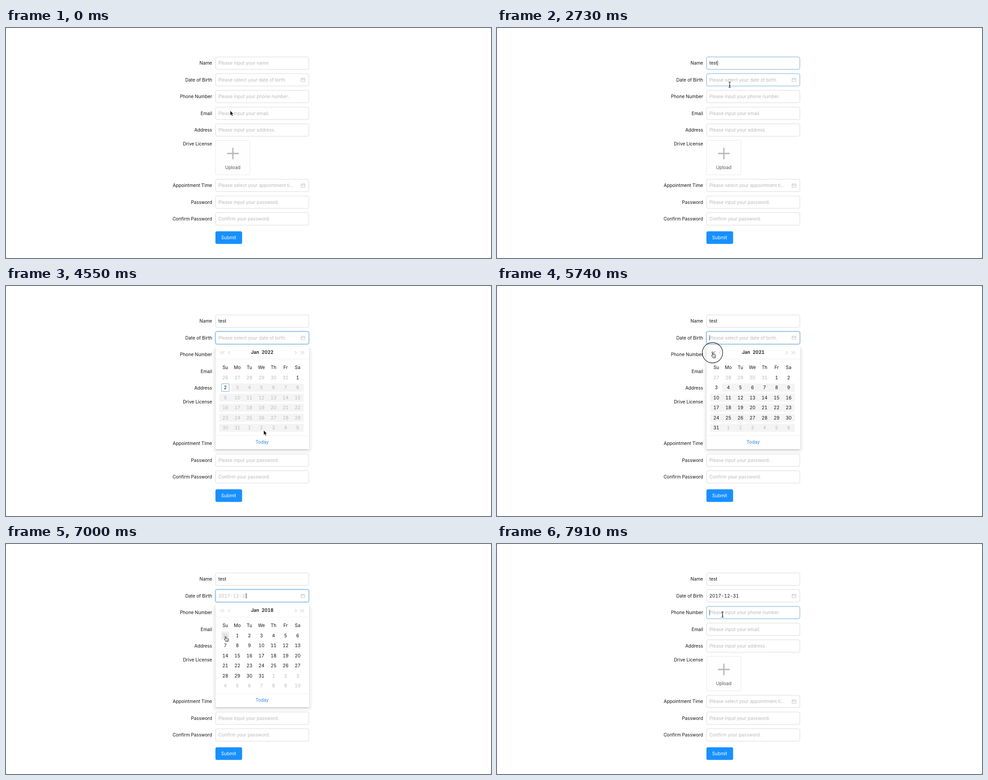
Animation, 1086 px wide and 515 px high, one loop 8 s. Source, as an HTML page:

```html
<!DOCTYPE html>
<html lang="en">
<head>
<meta charset="utf-8">
<title>Registration form</title>
<style>
  html, body { margin: 0; width: 100%; height: 100%; overflow: hidden; background: #999; }
  svg { display: block; width: 1086px; height: 515px; }
  text { font: 10.2px Inter, Roboto, sans-serif; font-variant-numeric: tabular-nums; white-space: pre; }
</style>
</head>
<body>
<svg id="stage" viewBox="0 0 1086 515"></svg>
<script>
const LOOP = 8000, STEP = 70;
const INK = '#141414', MUTED = '#b9b9b9', LINE = '#d9d9d9', BLUE = '#1890ff', FOCUS = '#6aa9d6';
const LEFT = 475.5, DAY = 864e5, TODAY = Date.UTC(2022, 0, 2);
const stage = document.getElementById('stage');

const YEAR_CLICKS = [5740, 5950, 6090, 6230];
const KEYS = [[1750, 't', 3.7], [1890, 'te', 9.7], [2100, 'tes', 15.1], [2240, 'test', 18.6]];
const OPEN = 2940, CLOSE = 7210, DATE_FOCUS = 2870, PHONE_FOCUS = 7840;

// Pointer path: time, x, y
const PATH = [
  [70, 502, 185], [490, 526, 74], [630, 519.5, 82], [1260, 519.5, 82], [1400, 520.5, 86],
  [2380, 520.5, 86], [2730, 521, 127], [3150, 521, 127], [3990, 569, 293], [4200, 586, 338],
  [4340, 586, 338], [4550, 577, 323], [4760, 562, 285], [4900, 562, 285], [5530, 483, 149.5],
  [6370, 483, 149.5], [6860, 491.5, 207], [7280, 491.5, 207], [7770, 505, 158], [LOOP, 505, 158]
];

const clamp = v => Math.max(0, Math.min(1, v));
const ease = v => v * v * (3 - 2 * v);

function pointerAt(t) {
  const i = PATH.findIndex(p => p[0] > t);
  if (i === 0) return PATH[0].slice(1);
  const [t0, x0, y0] = PATH[i - 1], [t1, x1, y1] = PATH[i];
  const k = ease((t - t0) / (t1 - t0));
  return [x0 + (x1 - x0) * k, y0 + (y1 - y0) * k];
}

const text = (x, mid, str, fill = INK, anchor = 'start', weight = 400) =>
  `<text x="${x}" y="${mid + 3.7}" fill="${fill}" text-anchor="${anchor}" style="font-weight:${weight}">${str}</text>`;
const rect = (x, y, w, h, attrs) => `<rect x="${x}" y="${y}" width="${w}" height="${h}" ${attrs}/>`;
const path = (d, stroke, width = 1, extra = '') =>
  `<path d="${d}" fill="none" stroke="${stroke}" stroke-width="${width}" ${extra}/>`;
const label = (mid, str) => text(461.5, mid, str, INK, 'end');
const caret = (x, mid) => path(`M${x} ${mid - 6}v12`, '#333', 0.9);

function calendarIcon(mid) {
  return path(`M660.8 ${mid - 3.2}h8.4v7.4h-8.4zM660.8 ${mid - 0.4}h8.4M663 ${mid - 4.7}v2.6M667 ${mid - 4.7}v2.6`, MUTED, 0.8);
}

function field(mid, name, str, { color = MUTED, border = LINE, glow = false, icon = false } = {}) {
  const halo = glow ? rect(468.5, mid - 14.5, 210, 29, 'rx="4" fill="none" stroke="#cfe6fa" stroke-width="3"') : '';
  return label(mid, name) + halo +
    rect(469.3, mid - 13.9, 208.8, 27.8, `rx="3.5" fill="#fff" stroke="${border}" stroke-width="1"`) +
    text(LEFT, mid, str, color) + (icon ? calendarIcon(mid) : '');
}

function uploadBox() {
  return label(259.5, 'Drive License') +
    rect(469.3, 251.8, 77, 77, `rx="3" fill="#fefefe" stroke="${LINE}" stroke-dasharray="2.2 1.5" stroke-width="1"`) +
    path('M495 281h26M508 268v26', '#b7b7b7', 2.8) +
    text(507.7, 312, 'Upload', '#555', 'middle');
}

function chevrons(xs, dir, color) {
  return xs.map(x => path(`M${x} 145.8l${-3.4 * dir} 3.5l${3.4 * dir} 3.5`, color)).join('');
}

const gridStart = year => {
  const first = Date.UTC(year, 0, 1);
  return first - new Date(first).getUTCDay() * DAY;
};

// Selectable day under the pointer, or -1
function hoveredCell(x, y, year) {
  const col = Math.floor((x - 477.5) / 27), row = Math.floor((y - 194) / 22.5);
  if (col < 0 || col > 6 || row < 0 || row > 5) return -1;
  const i = row * 7 + col;
  return gridStart(year) + i * DAY > TODAY ? -1 : i;
}

function popup(t, year, hover, overPrev) {
  const visible = Math.min(ease(clamp((t - OPEN + STEP) / 210)), 1 - ease(clamp((t - CLOSE) / 210)));
  if (visible <= 0) return '';
  let out = rect(462.5, 138, 223, 236, 'rx="9" fill="#000" opacity=".035"') +
    rect(469, 135, 210, 231, 'rx="2" fill="#fff" style="filter:drop-shadow(0 1.5px 1.5px rgba(0,0,0,.22))"') +
    path('M469 163.5h210M469 335h210', '#efefef', 0.9) +
    chevrons([484, 488.5], 1, overPrev ? '#333' : MUTED) + chevrons([501], 1, MUTED) +
    chevrons([647, 659.3, 663.8], -1, MUTED) +
    text(548.7, 148, 'Jan', INK, 'start', 600) + text(572.5, 148, year, INK, 'start', 600) +
    text(573.5, 349.5, 'Today', '#2a86d8', 'middle');
  ['Su', 'Mo', 'Tu', 'We', 'Th', 'Fr', 'Sa'].forEach((d, i) => out += text(491 + 27 * i, 182, d, INK, 'middle'));

  const shade = 1 - clamp((t - YEAR_CLICKS[0]) / 300);
  const start = gridStart(year);
  for (let i = 0; i < 42; i++) {
    const time = start + i * DAY, date = new Date(time);
    const x = 491 + 27 * (i % 7), y = 205 + 22.5 * Math.floor(i / 7);
    const active = date.getUTCFullYear() === year && date.getUTCMonth() === 0 && time <= TODAY;
    if (i > 7 && shade) out += rect(x - 13.5, y - 9, 27.1, 18, `fill="#f4f4f4" opacity="${shade}"`);
    if (i === hover) out += rect(x - 9, y - 9, 18, 18, 'rx="1.5" fill="#f0f0f0"');
    if (time === TODAY) out += rect(x - 8.7, y - 8.7, 17.4, 17.4, `rx="1" fill="none" stroke="${FOCUS}"`);
    out += text(x, y, date.getUTCDate(), active ? INK : MUTED, 'middle');
  }
  return `<g opacity="${visible}" transform="translate(0 135) scale(1 ${0.8 + 0.2 * visible}) translate(0 -135)">${out}</g>`;
}

const CURSORS = {
  arrow: '<path d="M0 0V10.6L2.4 8.4L4.1 12.3L6 11.5L4.3 7.7H7.6Z" fill="#000" stroke="#fff" stroke-width=".7"/>',
  beam: path('M-2.5 -6Q0 -6 0 -4.5Q0 -6 2.5 -6M0 -4.5V4.5M-2.5 6Q0 6 0 4.5Q0 6 2.5 6M-1.3 1.8h2.6', '#111', 1.1),
  hand: '<path d="M-.8 .4Q0 -.8 1 .4V4.4L2.6 4.1L4.2 4.6L5.6 5Q6.9 5.3 6.7 7Q6.5 9 5.6 11.4H.6Q-.6 8.8 -2.6 6.7Q-2.8 5.3 -.8 6.4Z" fill="#fff" stroke="#111" stroke-width=".95"/>' +
    path('M1.8 7.2v2.5M3.3 7.2v2.5M4.8 7.2v2.5', '#111', 0.6)
};

function cursor(t, x, y, clickable) {
  if (t >= 1750 && t < 2380) return '';
  const popupOpen = t >= OPEN && t < CLOSE + 140;
  let kind = 'arrow';
  if (clickable) kind = 'hand';
  else if (t >= 1330 && (y < 135 || !popupOpen)) kind = 'beam';
  return `<g transform="translate(${x} ${y})">${CURSORS[kind]}</g>`;
}

function scene(t) {
  const [x, y] = pointerAt(t);
  const year = 2022 - YEAR_CLICKS.filter(c => t >= c).length;
  const open = t >= OPEN && t < CLOSE + 140;
  const overPrev = open && x < 493 && y > 140 && y < 160;
  const hover = open ? hoveredCell(x, y, year) : -1;
  const blinkOn = Math.floor((t + 300) / 500) % 2 === 0;

  const typed = KEYS.filter(k => t >= k[0]).pop();
  const nameFocus = t >= 1260 && t < DATE_FOCUS;
  const dateFocus = t >= DATE_FOCUS && t < PHONE_FOCUS;
  const dateHover = t >= 2380 && t < DATE_FOCUS && y > 102;

  let dateText = 'Please select your date of birth.', dateCaret = 476;
  if (t >= CLOSE || hover >= 0) {
    dateText = t >= CLOSE ? '2017-12-31' : new Date(gridStart(year) + hover * DAY).toISOString().slice(0, 10);
    dateCaret = 537.6;
  }

  let out = rect(0, 0, 1086, 515, 'rx="2.5" fill="#fff"') +
    field(78.7, 'Name', typed ? typed[1] : 'Please input your name',
      { color: typed ? INK : MUTED, border: nameFocus ? FOCUS : LINE }) +
    field(116, 'Date of Birth', dateText,
      { color: t >= CLOSE ? INK : MUTED, border: dateFocus || dateHover ? FOCUS : LINE, glow: dateFocus, icon: true }) +
    field(153.5, 'Phone Number', 'Please input your phone number.', { border: t >= 7770 ? FOCUS : LINE }) +
    field(191, 'Email', 'Please input your email.') +
    field(228.4, 'Address', 'Please input your address.') +
    uploadBox() +
    field(352.6, 'Appointment Time', 'Please select your appointment ti...', { icon: true }) +
    field(390, 'Password', 'Please input your password.') +
    field(427.5, 'Confirm Password', 'Confirm your password.') +
    rect(469, 455.2, 59.7, 28.4, `rx="3.5" fill="${BLUE}"`) +
    text(498.6, 469.3, 'Submit', '#fff', 'middle');

  if (nameFocus && t >= 1400) out += caret(typed ? LEFT + typed[2] : 476, 78.7);
  if (dateFocus && blinkOn) out += caret(dateCaret, 116);
  if (t >= PHONE_FOCUS) out += caret(476, 153.5);

  out += popup(t, year, hover, overPrev);
  if (t >= 5670 && t < 6300) out += `<circle cx="482.5" cy="149.5" r="22.8" fill="none" stroke="#111" stroke-width="1.2"/>`;
  return out + cursor(t, x, y, overPrev || hover >= 0);
}

let shown = -1;
function frame() {
  const t = Math.min(Math.floor(performance.now() % LOOP / STEP) * STEP, 7910);
  if (t !== shown) stage.innerHTML = scene(shown = t);
  requestAnimationFrame(frame);
}
frame();
</script>
</body>
</html>
```
